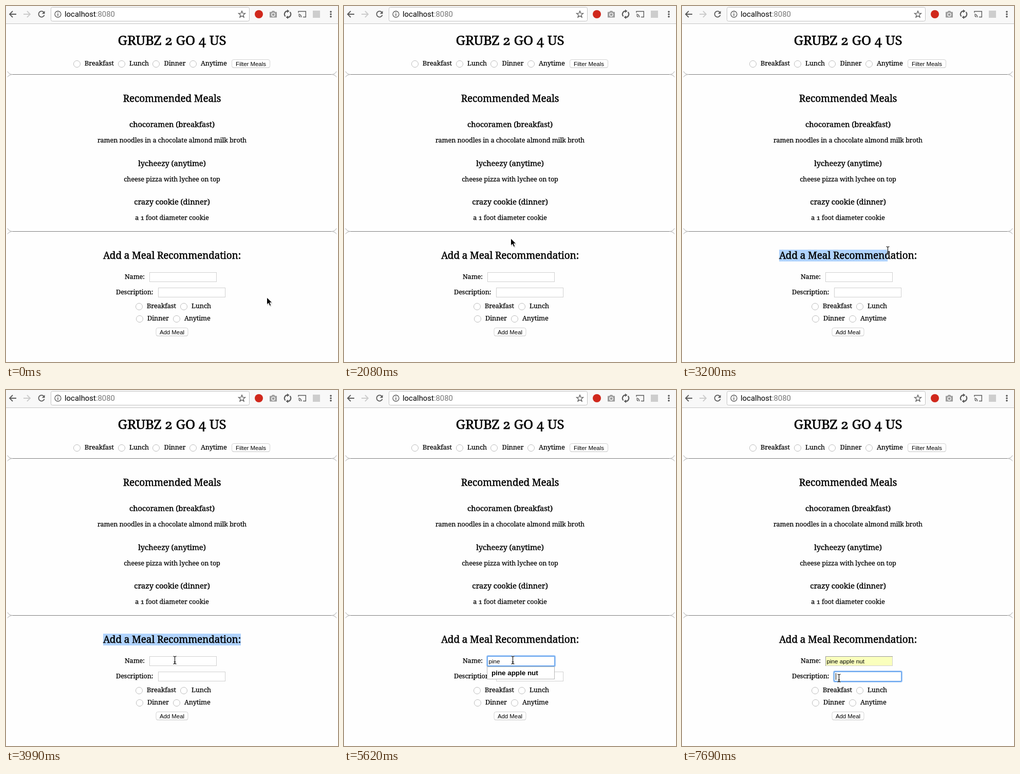
Recreate the animation shown at these times as an HTML page. Size 646 px wide and 694 px high, loop 8000 ms.

```html
<!DOCTYPE html>
<html lang="en">
<head>
<meta charset="utf-8">
<title>Meal recommendations</title>
<style>
  html, body { margin: 0; width: 100%; height: 100%; overflow: hidden; background: #fefefe; }
  svg { display: block; width: 646px; height: 694px; }
  .serif text {
    font-family: "Noto Serif", serif; font-size: 12.7px; letter-spacing: -.007em;
    font-variant-numeric: oldstyle-nums; stroke: #000; stroke-width: .25px;
  }
  .serif .h1 { font-size: 26px; stroke-width: .6px; }
  .serif .h2 { font-size: 19px; stroke-width: .5px; }
  .serif .h3 { font-size: 14.8px; stroke-width: .4px; }
  .mid { text-anchor: middle; }
  .ui { font-family: "Liberation Sans", Arial, sans-serif; font-size: 11.4px; }
  .entry { font-size: 11.7px; }
  .option { font-size: 13.4px; font-weight: bold; }
  .url { font-family: Roboto, sans-serif; font-size: 14.9px; }
  .icon { fill: none; stroke: #5a5a5a; stroke-width: 1.8; }
</style>
</head>
<body>
<svg viewBox="0 0 646 694" xmlns="http://www.w3.org/2000/svg">
  <rect width="646" height="694" fill="#fefefe"/>

  <g id="toolbar">
    <rect width="646" height="34" fill="#f8f8f8"/>
    <path d="M0 34.5H646" stroke="#c4c4c4"/>
    <path class="icon" d="M20 16H7.5M13 10L7 16L13 22"/>
    <path class="icon" d="M34 16H46.5M41 10L47 16L41 22" style="stroke:#cbcbcb"/>
    <path class="icon" d="M73.6 12.2A5.7 5.7 0 1 0 74.6 17.6"/>
    <path d="M75.5 9.5V15.2H69.8Z" fill="#5a5a5a"/>
    <rect x="87.5" y="2.5" width="386" height="27" rx="3" fill="#fff" stroke="#c2c2c2"/>
    <circle class="icon" cx="101" cy="16" r="6" style="stroke-width:1.3"/>
    <path class="icon" d="M101 15V19.4M101 12.2V13.7" style="stroke-width:1.5"/>
    <text class="url" x="114" y="21">localhost<tspan fill="#777">:8080</tspan></text>
    <path id="star" class="icon" style="stroke-width:1.3"/>
    <circle cx="492" cy="16" r="8" fill="#d0281c"/>
    <path d="M514 11.5H516.5L518 9.5H522L523.5 11.5H526Q527 11.5 527 12.5V21.5Q527 22.5 526 22.5H514Q513 22.5 513 21.5V12.5Q513 11.5 514 11.5Z" fill="#9b9b9b"/>
    <circle cx="520" cy="16.8" r="3.2" fill="#9b9b9b" stroke="#f8f8f8" stroke-width="1.4"/>
    <path class="icon" d="M543.5 20.2A6.2 6.2 0 0 1 548 9.8M552.5 11.8A6.2 6.2 0 0 1 548 22.2" style="stroke-width:2.2"/>
    <path d="M547 6.8L551.5 10L547 13.2ZM549 18.8L544.5 22L549 25.2Z" fill="#5a5a5a"/>
    <path class="icon" d="M569 13V10.5H583.3V21.5H578M569 16A6 6 0 0 1 575 22M569 19A3 3 0 0 1 572 22" style="stroke-width:1.4"/>
    <rect x="597" y="9" width="14" height="14" fill="#cdcdcd"/>
    <path d="M632 11.2h.01M632 16h.01M632 20.8h.01" stroke="#555" stroke-width="3.6" stroke-linecap="round"/>
  </g>

  <rect id="selection" x="189" y="475" height="23" fill="#b0d3fd"/>
  <g id="page" class="serif"></g>
  <g id="buttons"></g>

  <g id="fields">
    <rect id="nameBox" x="279.5" y="519.5" width="130" height="18" stroke="#d0d0d0"/>
    <path id="filledEdge" d="M279.5 538V519.5H410" fill="none" stroke="#999"/>
    <rect id="descBox" x="296.5" y="549.5" width="130" height="18" fill="#fff" stroke="#d0d0d0"/>
    <g id="ring" fill="none" stroke="#5b9ff0">
      <rect x="-1" y="-1" width="133" height="21" rx="2.5" stroke-width="2.6" opacity=".4"/>
      <rect x="0" y="0" width="131" height="19" rx="1" stroke-width="1.8" opacity=".85"/>
    </g>
    <text id="entry" class="ui entry" x="281.5" y="533"></text>
    <rect id="caret" width="1" height="13"/>
  </g>

  <g id="menu">
    <rect id="menuBox" x="278.5" y="539.5" width="131" height="24" stroke="#b5b5b5"/>
    <text class="ui option" x="287" y="556">pine apple nut</text>
  </g>

  <g id="arrow">
    <path d="M.5 1V15L3.8 12L6 17.3L8.6 16.2L6.4 11H10.8Z" opacity=".18" transform="translate(.5 1.2)"/>
    <path d="M0 0V14.2L3.3 11.2L5.6 16.6L8.2 15.5L5.9 10.2H10.3Z" stroke="#fff"/>
  </g>
  <g id="beam" fill="none">
    <path id="halo" stroke="#fff" stroke-width="2.4" opacity=".7"/>
    <path id="stem" stroke="#000" stroke-width="1.1"/>
  </g>
</svg>

<script>
const LOOP = 8000;
const $ = id => document.getElementById(id);
const show = (id, on) => $(id).setAttribute("display", on ? "inline" : "none");
const set = (id, attrs) => {
  for (const key in attrs) $(id).setAttribute(key, attrs[key]);
};

// Static page
const text = (x, y, str, cls = "") => `<text x="${x}" y="${y}" class="${cls}">${str}</text>`;
const centred = (y, str, cls = "") => text(323, y, str, "mid " + cls);
const radio = (x, y, label, labelX) =>
  `<circle cx="${x}" cy="${y}" r="6.5" fill="#fff" stroke="#bcbcbc"/>` + text(labelX, y + 3, label);
const button = (x, y, w, label) =>
  `<rect x="${x + .5}" y="${y + 1}" width="${w}" height="16" rx="3.5" fill="#ddd"/>
   <rect x="${x + .5}" y="${y + .5}" width="${w}" height="15.5" rx="3.5" fill="#fff" stroke="#d2d2d2"/>` +
  text(x + w / 2 + .5, y + 12.5, label, "ui mid");
const rule = y =>
  `<path d="M12 ${y}H634" stroke="#7d7d7d"/>
   <path d="M3 ${y - 6}Q6 ${y} 13 ${y}Q6 ${y} 3 ${y + 5}M643 ${y - 6}Q640 ${y} 633 ${y}Q640 ${y} 643 ${y + 5}"
     fill="none" stroke="#aaa"/>`;
const meal = (y, name, about) => centred(y, name, "h3") + centred(y + 30, about);

$("page").innerHTML =
  centred(76, "GRUBZ 2 GO 4 US", "h1") +
  radio(138, 113, "Breakfast", 153) + radio(225, 113, "Lunch", 240) +
  radio(292, 113, "Dinner", 307.5) + radio(364, 113, "Anytime", 379) +
  rule(133.5) +
  centred(187, "Recommended Meals", "h2") +
  meal(236, "chocoramen (breakfast)", "ramen noodles in a chocolate almond milk broth") +
  meal(312, "lycheezy (anytime)", "cheese pizza with lychee on top") +
  meal(387, "crazy cookie (dinner)", "a 1 foot diameter cookie") +
  rule(439.5) +
  centred(493, "Add a Meal Recommendation:", "h2") +
  text(231, 532, "Name:") + text(214, 562, "Description:") +
  radio(259, 586, "Breakfast", 274) + radio(346, 586, "Lunch", 361) +
  radio(260, 610, "Dinner", 275) + radio(332, 610, "Anytime", 347);

$("buttons").innerHTML = button(439, 104, 74, "Filter Meals") + button(291.5, 627, 62, "Add Meal");

const starPoints = Array.from({ length: 10 }, (_, i) => {
  const r = i % 2 ? 2.9 : 6.8, a = i * Math.PI / 5;
  return [459 + r * Math.sin(a), 16.5 - r * Math.cos(a)].map(v => v.toFixed(2));
});
set("star", { d: "M" + starPoints.join("L") + "Z" });

const beamPath = "M-3 -7.5Q0 -7.5 0 -5.5V5.5Q0 7.5 -3 7.5M3 -7.5Q0 -7.5 0 -5.5M0 5.5Q0 7.5 3 7.5M-2 3.5H2";
set("halo", { d: beamPath });
set("stem", { d: beamPath });

// Pointer moves: start, end, step count, then two curve handles and the goal
const START = [508, 569];
const MOVES = [
  [1440, 1750, 6, [480, 569], [400, 465], [372, 465]],
  [1960, 2420, 9, [330, 445], [200, 445], [164, 491]],
  [2480, 2720, 3, [172, 491], [180, 490], [188, 489]],
  [2810, 3380, 11, [260, 470], [400, 470], [495, 485]],
  [3560, 3990, 8, [450, 505], [380, 526], [328, 526]],
  [6720, 6780, 2, [325, 528], [319, 532], [315, 536]],
  [6840, 7180, 6, [300, 548], [285, 562], [305, 561]]
];
const smooth = u => u * u * (3 - 2 * u);
const bezier = (a, b, c, d, u) => {
  const v = 1 - u;
  return v * v * v * a + 3 * v * v * u * b + 3 * v * u * u * c + u * u * u * d;
};

function pointerAt(t) {
  let from = START;
  for (const [t0, t1, steps, h1, h2, to] of MOVES) {
    if (t < t0) return from;
    if (t < t1) {
      const step = Math.floor((t - t0) / (t1 - t0) * (steps - 1)) + 1;
      const u = smooth(step / steps);
      return [0, 1].map(i => bezier(from[i], h1[i], h2[i], to[i], u));
    }
    from = to;
  }
  return from;
}

const between = (t, a, b) => t >= a && t < b;
const inside = ([x, y], x0, y0, x1, y1) => x >= x0 && x <= x1 && y >= y0 && y <= y1;
const overText = p =>
  inside(p, 187, 475, 457, 499) || inside(p, 279, 519, 410, 538) || inside(p, 296, 549, 427, 568);

const KEYS = [4790, 4880, 4970, 5140];
const CARET_ON = [[4170, 4640], [4790, 5620], [6040, 6510], [6980, 7480], [7690, LOOP]];

function draw(t) {
  const pointer = pointerAt(t);
  const dragging = between(t, 2720, 3560);
  const beam = dragging || overText(pointer);
  const place = `translate(${pointer.map(Math.round)})`;
  show("beam", beam);
  show("arrow", !beam);
  set("beam", { transform: place + " translate(.5 .5)" });
  set("arrow", { transform: place + " translate(-.5 -1)" });

  show("selection", between(t, 2810, 4170));
  set("selection", { width: t < 3380 ? Math.max(0, Math.min(pointer[0], 457) - 189) : 268 });

  const filled = t >= 5680, inDesc = t >= 7690;
  const typed = "pine".slice(0, KEYS.filter(k => t >= k).length);
  $("entry").textContent = filled ? "pine apple nut" : typed;
  set("nameBox", { fill: filled ? "#faffbd" : "#fff" });
  show("filledEdge", inDesc);

  show("ring", t >= 4170);
  set("ring", { transform: inDesc ? "translate(296 549)" : "translate(279 519)" });

  const width = $("entry").textContent ? $("entry").getComputedTextLength() : 0;
  show("caret", CARET_ON.some(([a, b]) => between(t, a, b)));
  set("caret", inDesc ? { x: 299, y: 552 } : { x: Math.round(282 + width), y: 522 });

  show("menu", between(t, 4790, 6040));
  set("menuBox", { fill: filled ? "#cdcdcd" : "#fff" });
}

function tick() {
  draw(performance.now() % LOOP);
  requestAnimationFrame(tick);
}
tick();
</script>
</body>
</html>
```
